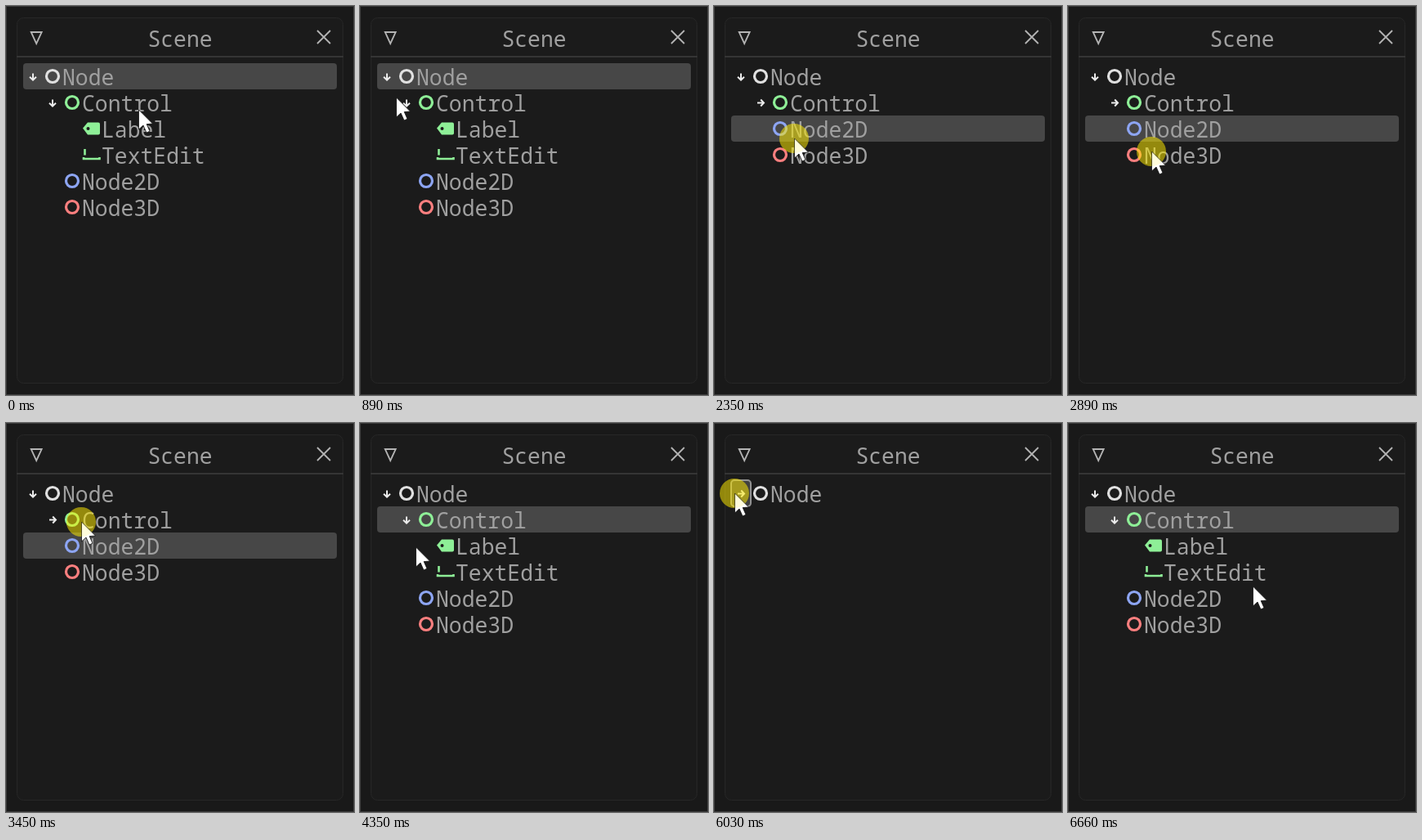
Animation, 426 px wide and 476 px high, one loop 8.33 s. Source, as an HTML page:

```html
<!DOCTYPE html>
<html lang="en">
<head>
<meta charset="utf-8">
<title>Scene tree</title>
<style>
  html, body { margin: 0; width: 100%; height: 100%; overflow: hidden; background: #191919; }
  svg { display: block; width: 426px; height: 476px; }
  text { font: 200 26.4px "Noto Sans Mono", "DejaVu Sans Mono", monospace; fill: #a0a0a0; }
  .line { fill: none; stroke: #b4b4b4; stroke-width: 1.8; }
  .arrow { fill: none; stroke: #ececec; stroke-width: 2; }
  .ring { fill: none; stroke-width: 3.2; }
  .hover { fill: #404040; stroke: #929292; stroke-width: 2; }
</style>
</head>
<body>
<svg viewBox="0 0 426 476">
  <rect width="426" height="476" fill="#191919"/>
  <rect x=".5" y=".5" width="425" height="475" fill="none" stroke="#383838"/>
  <rect x="13.5" y="14.5" width="399" height="447" rx="8" fill="#1b1b1b" stroke="#272727"/>
  <path d="M13 62H413" stroke="#353535" stroke-width="2"/>
  <path class="line" d="M30.7 32H43.7L37.2 46Z"/>
  <path class="line" d="M381 30L397 46M397 30L381 46"/>
  <text x="213" y="50" text-anchor="middle">Scene</text>
  <rect id="selection" x="21" width="384" height="32" rx="4" fill="#474747"/>
  <g id="tree"></g>
  <circle class="press" r="18" fill="#ffea00" opacity=".45"/>
  <path id="cursor" d="M.5 0V24L6 19L10 28L14 26.2L10.2 17.6L17.5 17Z" fill="#fff" stroke="#111" stroke-width=".8"/>
  <circle class="press" r="18" fill="#ffea00" opacity=".14"/>
</svg>
<script>
const LOOP = 8330, STEP = 70, PHASE = 40, HOLD = 140;
const TOP = 70, ROW = 32, INDENT = 24;

const ring = color => `<circle class="ring" cx="12" cy="16" r="7.5" stroke="${color}"/>`;
const tag = `<path d="M1 15.5L7 8.5H20Q22 8.5 22 10.5V21.5Q22 23.5 20 23.5H7Z" fill="#8eef97"/>
  <circle cx="7.5" cy="16" r="2" fill="#1b1b1b"/>`;
const field = `<path d="M3.5 9V16.5M2 19V21H21.5V19" fill="none" stroke="#8eef97" stroke-width="2.6"/>`;

const rows = [
  { name: "Node", depth: 0, icon: ring("#e0e0e0"), fold: true },
  { name: "Control", depth: 1, icon: ring("#8eef97"), fold: true },
  { name: "Label", depth: 2, icon: tag },
  { name: "TextEdit", depth: 2, icon: field },
  { name: "Node2D", depth: 1, icon: ring("#8da5f3") },
  { name: "Node3D", depth: 1, icon: ring("#fc7f7f") }
];

const arrowAt = depth => ({ x: 25 + depth * INDENT, y: 86 + depth * ROW });
const home = { x: 162, y: 127 };

const moves = [
  { from: 190, until: 680, to: arrowAt(0) },
  { from: 680, until: 960, to: arrowAt(1) },
  { from: 1310, until: 1860, to: { x: 94, y: 146 } },
  { from: 1930, until: 2760, to: { x: 102, y: 178 } },
  { from: 2890, until: 3400, to: { x: 92, y: 121 } },
  { from: 3590, until: 4010, to: arrowAt(1) },
  { from: 4150, until: 4290, to: { x: 68, y: 152 } },
  { from: 4950, until: 5380, to: arrowAt(0) },
  { from: 6100, until: 6600, to: { x: 226, y: 200 } }
];

// Each folded span starts and ends with a click on the row's arrow.
const folded = { Control: [1310, 4150], Node: [5630, 6100] };
const drag = [2280, 3590];
const clicks = Object.values(folded).flat().map(up => [up - HOLD, up]);
const presses = [drag, ...clicks];

const $ = id => document.getElementById(id);
const within = (t, [a, b]) => t >= a && t < b;
const show = (el, on) => { el.style.display = on ? "" : "none"; };
const place = (el, x, y) => el.setAttribute("transform", `translate(${x} ${y})`);
const ease = u => u * u * (3 - 2 * u);
const snap = t => Math.max(0, PHASE + STEP * Math.floor((t - PHASE) / STEP));

for (const row of rows) {
  row.x = 21 + row.depth * INDENT;
  row.el = document.createElementNS("http://www.w3.org/2000/svg", "g");
  const fold = `<rect class="hover" width="24" height="32" rx="4"/>
    <path class="arrow" d="M12 12.5V20.5M8 16.7L12 20.5L16 16.7"/>`;
  row.el.innerHTML = `${row.fold ? fold : ""}
    <g transform="translate(24)">${row.icon}</g><text x="48" y="27">${row.name}</text>`;
  $("tree").append(row.el);
}

function pointer(t) {
  let { x, y } = home;
  for (const { from, until, to } of moves) {
    if (t < from) break;
    const k = ease(Math.min(1, (t - from) / (until - from)));
    x += (to.x - x) * k;
    y += (to.y - y) * k;
  }
  return [Math.round(x), Math.round(y)];
}

function render(t) {
  const [x, y] = pointer(t);
  const isOpen = name => !within(t, folded[name]);
  const selected = t < drag[0] ? "Node" : t < drag[1] ? "Node2D" : "Control";
  let top = TOP, selectionTop = null;

  for (const row of rows) {
    const shown = row.depth === 0 || isOpen("Node") && (row.depth === 1 || isOpen("Control"));
    show(row.el, shown);
    if (!shown) continue;
    place(row.el, row.x, top);
    if (row.name === selected) selectionTop = top;
    if (row.fold) {
      const hovered = within(x, [row.x, row.x + INDENT]) && within(y, [top, top + ROW]);
      show(row.el.querySelector(".hover"), hovered);
      row.el.querySelector(".arrow").setAttribute("transform",
        isOpen(row.name) ? "" : "rotate(-90 12 16.5)");
    }
    top += ROW;
  }

  show($("selection"), selectionTop !== null);
  $("selection").setAttribute("y", selectionTop ?? 0);
  place($("cursor"), x, y);
  const pressed = presses.some(p => within(t, p));
  for (const spot of document.querySelectorAll(".press")) {
    show(spot, pressed);
    place(spot, x, y);
  }
}

const begin = performance.now();
function tick() {
  render(snap((performance.now() - begin) % LOOP));
  requestAnimationFrame(tick);
}
tick();
</script>
</body>
</html>
```
